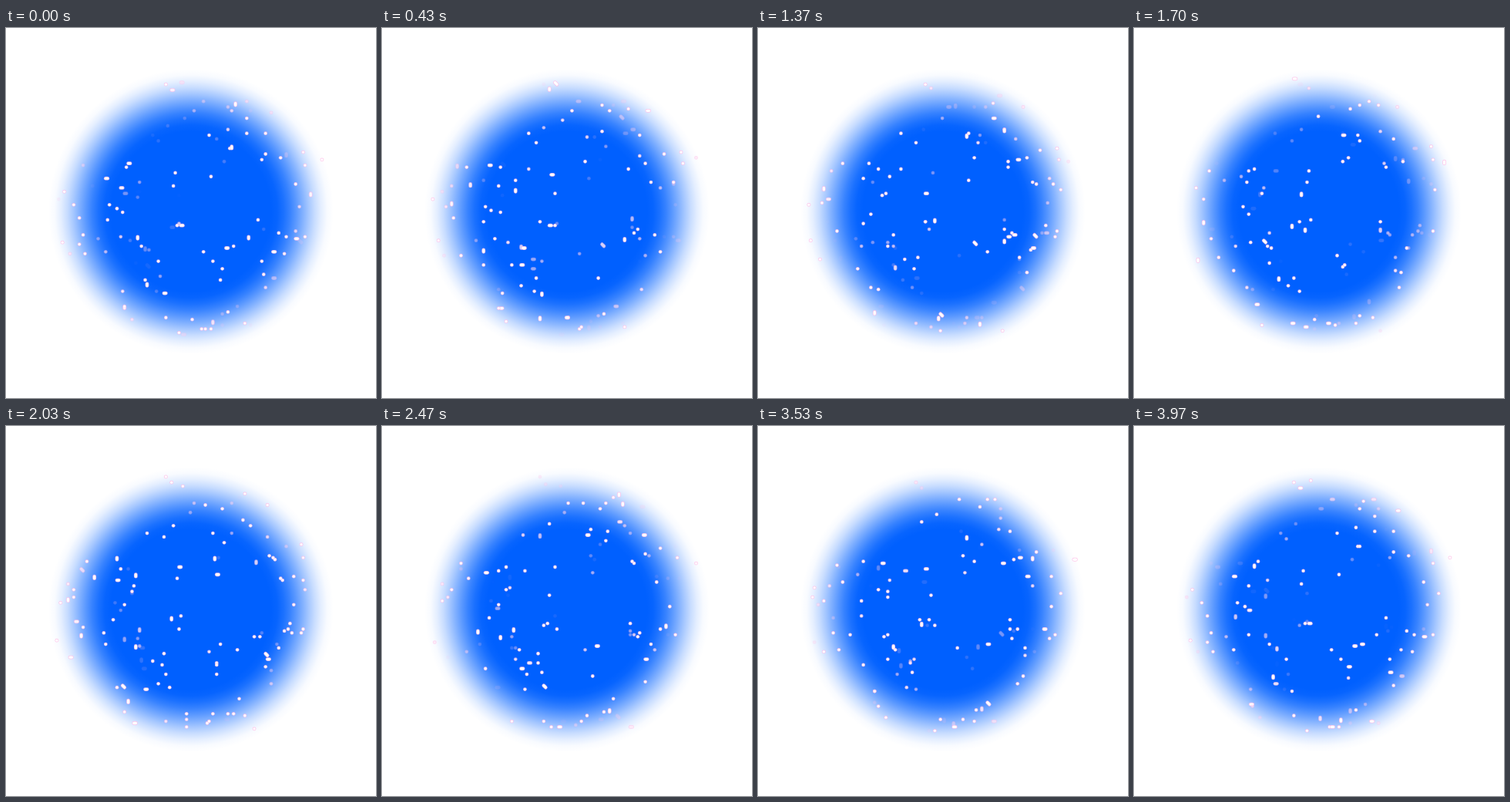
Animation, 480 px wide and 480 px high, one loop 4010 ms. Source, as an HTML page with a canvas:

```html
<!DOCTYPE html>
<html lang="en">
<head>
<meta charset="utf-8">
<title>Sparkling blue disc</title>
<style>
html, body { margin: 0; width: 100%; height: 100%; overflow: hidden; background: #fff; }
canvas { display: block; }
</style>
</head>
<body>
<canvas width="480" height="480"></canvas>
<script>
const ctx = document.querySelector('canvas').getContext('2d');
const LOOP = 4010, TAU = Math.PI * 2, CELL = 2.44, ORBIT = 4;

// Orbit centre x, y and starting angle in degrees
const anchors = [
  [244, 104, 105], [268, 138, 160], [290, 136, 240], [268, 171, 195],
  [292, 104, 90], [316, 103, 70], [315, 133, 115], [322, 179, 160],
  [352, 171, -30], [387, 174, 75], [359, 205, 85], [392, 214, 30],
  [107, 179, 65], [170, 197, 50], [159, 214, 180], [220, 201, 125],
  [138, 229, 180], [88, 225, 90], [97, 276, 110], [130, 286, 90],
  [166, 275, 180], [226, 260, 300], [318, 273, 195], [374, 270, 40],
  [350, 287, 125], [270, 305, 230], [204, 322, 180], [185, 325, 165],
  [335, 317, 115], [309, 380, 90], [268, 378, 90], [223, 392, 65],
  [156, 360, 145], [202, 146, 165], [215, 77, 75], [141, 175, 137]
];

let seed = 7;
function random() {
  seed = (seed * 16807) % 2147483647;
  return seed / 2147483647;
}

const makeDot = (x, y, angle) => ({
  x, y, angle, rate: 2 + Math.floor(random() * 6), shift: random() * TAU
});

const dots = anchors.map(([x, y, deg]) => makeDot(x, y, deg * TAU / 360));

// Looser companions thicken the groups, mostly in the lower half
for (const [x, y] of anchors) {
  const count = y > 220 ? 4 : 2;
  for (let i = 0; i < count; i++) {
    const a = random() * TAU, d = 7 + random() * 21;
    const cx = x + d * Math.cos(a), cy = y + d * Math.sin(a);
    if (Math.hypot(cx - 240, cy - 238) < 180) dots.push(makeDot(cx, cy, random() * TAU));
  }
}

const disc = ctx.createRadialGradient(240, 238, 104, 240, 238, 185);
for (let i = 0; i <= 10; i++) {
  const u = i / 10;
  disc.addColorStop(u, `rgba(0, 96, 255, ${1 - u * u * (3 - 2 * u)})`);
}

const snap = v => Math.round(v / CELL) * CELL;

function capsule(x, y, width, color) {
  const reach = 0.15;
  ctx.lineWidth = width;
  ctx.strokeStyle = color;
  ctx.beginPath();
  ctx.moveTo(snap(x - reach), snap(y - reach));
  ctx.lineTo(snap(x + reach) + 0.01, snap(y + reach));
  ctx.stroke();
}

function draw(now) {
  const turn = (now % LOOP) / LOOP * TAU;
  ctx.globalAlpha = 1;
  ctx.fillStyle = '#fff';
  ctx.fillRect(0, 0, 480, 480);
  ctx.fillStyle = disc;
  ctx.fillRect(0, 0, 480, 480);

  ctx.lineCap = 'round';
  for (const dot of dots) {
    const glow = 1 + 1.1 * Math.sin(dot.rate * turn + dot.shift);
    if (glow <= 0) continue;
    const x = dot.x + ORBIT * Math.cos(dot.angle - turn);
    const y = dot.y + ORBIT * Math.sin(dot.angle - turn);
    ctx.globalAlpha = Math.min(1, glow);
    capsule(x, y, 4.8, 'rgba(255, 190, 232, 0.85)');
    ctx.globalAlpha = Math.min(1, glow * glow);
    capsule(x, y, 3.3, '#fff');
  }
}

function frame() {
  draw(performance.now());
  requestAnimationFrame(frame);
}
frame();
</script>
</body>
</html>
```
